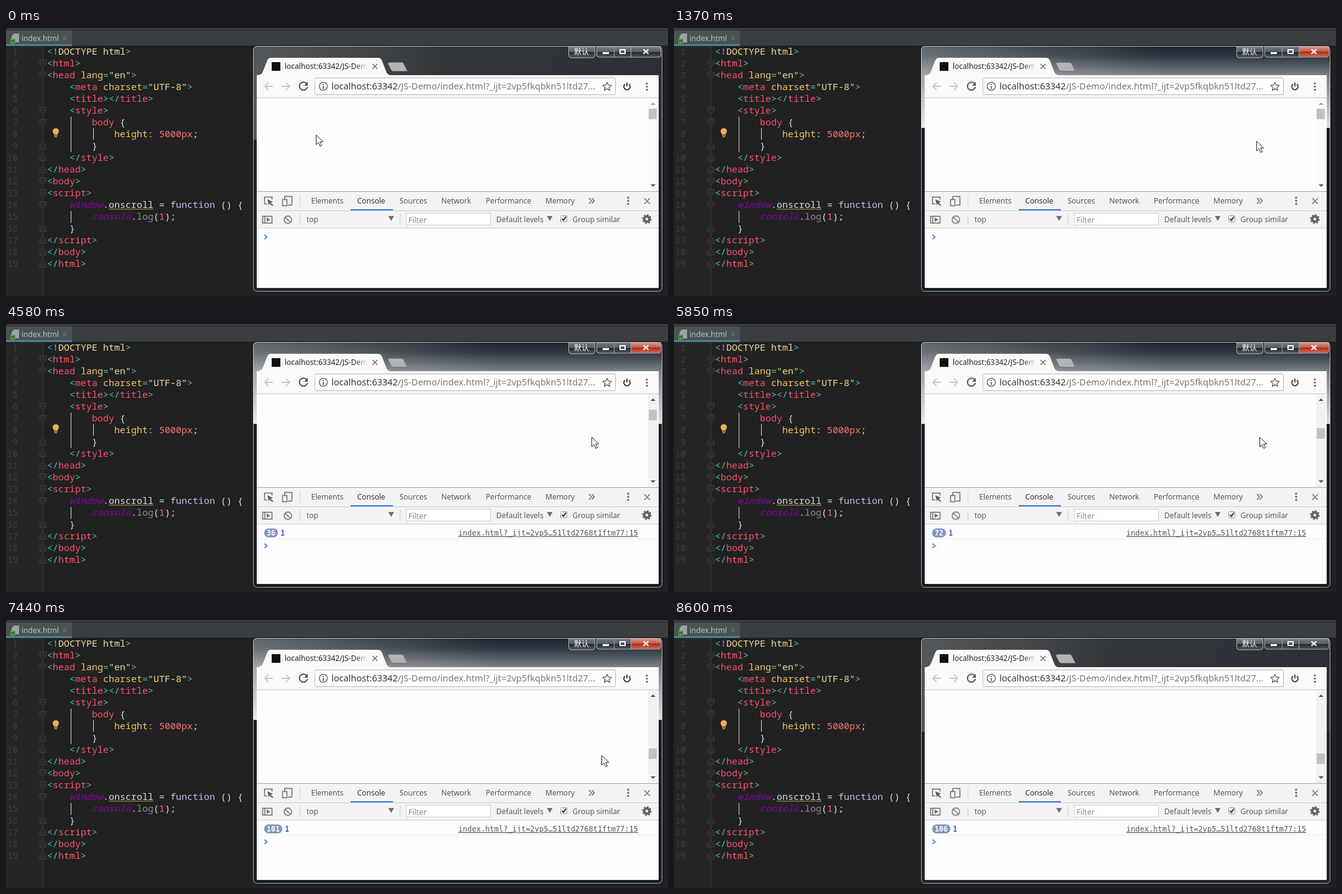
An HTML page for the animation above (8.64 s loop, 1064 px wide and 432 px high).

```html
<!DOCTYPE html>
<html lang="en">
<head>
<meta charset="UTF-8">
<title>Scroll counter</title>
<style>
  html, body { margin: 0; width: 100%; height: 100%; overflow: hidden; background: #212121; }
  svg { display: block; width: 1064px; height: 432px; }
  text { white-space: pre; font-family: "Noto Sans", "Open Sans", sans-serif; font-size: 12px; }
  #code text { font-family: "Noto Sans Mono", "DejaVu Sans Mono", monospace; font-size: 15px; }
  #code .number { font-size: 14px; fill: #3d4042; text-anchor: end; }
  .ui { font-size: 12.2px; fill: #5a5a5a; }
  .mono { font-family: "DejaVu Sans Mono", monospace; }
  .line { fill: none; stroke: #6e6e6e; stroke-width: 1.5; }
</style>
</head>
<body>
<svg viewBox="0 0 1064 432">
  <defs>
    <linearGradient id="idle">
      <stop stop-color="#55585b"/><stop offset=".45" stop-color="#34383d"/><stop offset="1" stop-color="#2b2f35"/>
    </linearGradient>
    <linearGradient id="focus" x2="0" y2="1">
      <stop stop-color="#1d2630"/><stop offset=".12" stop-color="#2b343e"/>
      <stop offset=".36" stop-color="#7d8288"/><stop offset="1" stop-color="#dde0e3"/>
    </linearGradient>
    <linearGradient id="shine">
      <stop stop-color="#fff" stop-opacity=".3"/><stop offset=".6" stop-color="#fff" stop-opacity="0"/>
    </linearGradient>
    <linearGradient id="glass" x2="0" y2="1">
      <stop stop-color="#fff" stop-opacity=".38"/><stop offset=".48" stop-color="#fff" stop-opacity=".2"/>
      <stop offset=".5" stop-color="#000" stop-opacity=".3"/><stop offset="1" stop-color="#fff" stop-opacity=".12"/>
    </linearGradient>
    <linearGradient id="red" x2="0" y2="1">
      <stop stop-color="#dc9a8b"/><stop offset=".48" stop-color="#c65b48"/>
      <stop offset=".5" stop-color="#a8291a"/><stop offset="1" stop-color="#d0664c"/>
    </linearGradient>
    <linearGradient id="fade" gradientUnits="userSpaceOnUse" x1="560" x2="582" y1="0" y2="0">
      <stop stop-color="#222"/><stop offset="1" stop-color="#222" stop-opacity="0"/>
    </linearGradient>
    <clipPath id="titleClip"><path d="M440 48h140v26h-140z"/></clipPath>
    <clipPath id="windowClip"><rect x="397" y="29" width="658" height="396" rx="6"/></clipPath>
  </defs>

  <!-- editor -->
  <path fill="#212121" d="M0 0h1064v432H0z"/>
  <path fill="#3a3e40" d="M0 0h1064v28H0z"/>
  <path fill="#2a2d2f" d="M0 3h1064v1H0zM0 28h1064v1H0z"/>
  <path fill="#4b5254" d="M0 4h106v23H0z"/>
  <path fill="#4a8295" d="M0 26h106v3H0z"/>
  <path fill="#252525" d="M0 29h59v403H0z"/>
  <path fill="#9ba3a7" d="M13 9h8v14H9V13z"/>
  <path fill="#62a348" d="M7 17h8v8H7z"/>
  <path d="M9 18.500v5m4-5v5m-4-2.500h4" stroke="#24371d" fill="none"/>
  <text x="25" y="21" fill="#bfc3c5">index.html</text>
  <path d="M91.500 13.500l6 6m0-6l-6 6" stroke="#85898b"/>
  <path d="M59.500 29v403" stroke="#3b3b3b"/>
  <g id="code"></g>
  <path d="M104.500 143v57m36-39v19m-36 115v19" stroke="#d6d6d6"/>
  <path id="wave" fill="none" stroke="#b69a52"/>
  <circle cx="80" cy="166.500" r="5" fill="#f3b04b"/>
  <path fill="#f3b04b" d="M77 168h6v4h-6z"/>
  <path d="M77 173.500h6m-5 2h4" stroke="#c5c5c5"/>

  <!-- browser frame -->
  <g clip-path="url(#windowClip)">
    <path fill="url(#idle)" d="M397 29h658v396H397z"/>
    <path fill="#20242a" d="M397 180h658v245H397z"/>
    <g id="active">
      <path fill="url(#focus)" d="M397 29h658v132H397z"/>
      <path fill="url(#shine)" d="M397 29h658v132H397z"/>
      <path fill="#171e27" d="M397 161h658v264H397z"/>
    </g>
  </g>
  <rect x="396.500" y="28.500" width="659" height="397" rx="7" fill="none" stroke="#0d0f12"/>
  <rect x="397.500" y="29.500" width="657" height="395" rx="6" fill="none" stroke="#d5dade" stroke-opacity=".8"/>
  <path d="M904.500 30v14q0 4 4 4h34q4 0 4-4V30zM949.500 30v13q0 4 4 4h96q3 0 3-4V30z" fill="url(#glass)" stroke="#b2b7bc"/>
  <path id="closeRed" fill="url(#red)" d="M1005 30h47v13q0 3-3 3h-44z"/>
  <path d="M977.500 30v17m27-17v17" stroke="#a6abb0"/>
  <text x="925" y="43" text-anchor="middle" fill="#fff" style="font-family:'Noto Sans CJK SC','Noto Sans CJK',sans-serif">默认</text>
  <path d="M959 40.500h10" stroke="#fff" stroke-width="3"/>
  <path d="M987 35h8v6h-8z" fill="none" stroke="#fff" stroke-width="2"/>
  <path d="M1024.500 34.500l8 7m0-7l-8 7" stroke="#fff" stroke-width="2.200"/>

  <!-- tabs and address bar -->
  <path fill="#b2b4b6" stroke="#74777a" d="M616 55.500h20q2 0 3 2l6 12h-22q-3 0-4-2l-5-10q0-2 2-2z"/>
  <path fill="#f9f9f9" d="M403 76q8 0 10-6l7-18q2-4 6-4h172q4 0 6 4l7 18q2 6 8 6h430v37H403z"/>
  <path fill="#111" d="M427 55h14v14h-14z"/>
  <text x="448" y="66" fill="url(#fade)" clip-path="url(#titleClip)">localhost:63342/JS-Demo</text>
  <path class="line" d="M589 58l8 8m0-8l-8 8"/>
  <path d="M429 94h-13m6-6l-6 6 6 6M443 94h13m-6-6l6 6-6 6" fill="none" stroke="#cacaca" stroke-width="1.800"/>
  <path d="M483.500 90a6.500 6.500 0 1 0 1 5" fill="none" stroke="#555" stroke-width="2"/>
  <path d="M485 87v6h-6z" fill="#555"/>
  <rect x="496.500" y="80.500" width="483" height="27" rx="2" fill="#fff" stroke="#b4b4b4"/>
  <circle class="line" cx="510" cy="94" r="6.500"/>
  <path d="M510 90v2m0 1.500v5" stroke="#555" stroke-width="1.600"/>
  <text x="523" y="99" style="font-size:14.5px" fill="#777"><tspan fill="#333">localhost:63342</tspan>/JS-Demo/index.html?_ijt=2vp5fkqbkn51ltd27...</text>
  <path class="line" stroke-linejoin="round" d="M966 87.500l2 4.500 5 .5-3.800 3.300 1.200 4.700-4.400-2.500-4.400 2.500 1.200-4.700-3.800-3.300 5-.5z"/>
  <path d="M995 90.500a5 5 0 1 0 6 0M998 88v6" fill="none" stroke="#333" stroke-width="1.800"/>
  <g fill="#555"><circle cx="1030" cy="89.500" r="1.500"/><circle cx="1030" cy="94.500" r="1.500"/><circle cx="1030" cy="99.500" r="1.500"/></g>

  <!-- page -->
  <path fill="#fdfdfd" d="M403 113h646v306H403z"/>
  <path d="M403 112.500h646" stroke="#c9c9c9"/>
  <path id="track" d="M1032 113h15v150h-15z"/>
  <path id="up" d="M1036 124l4-4 4 4z"/>
  <path fill="#505050" d="M1036 252l4 4 4-4z"/>
  <rect id="thumb" x="1033" width="13" height="17" fill="#c1c1c1"/>

  <!-- developer tools -->
  <path fill="#f3f3f3" d="M403 264h646v59H403z"/>
  <path d="M403 263.500h646" stroke="#a8a8a8"/>
  <path d="M403 294.500h646M403 322.500h646M472.500 270v18m0 12v17M633.500 300v17" stroke="#cfcfcf"/>
  <path fill="#3b78e7" d="M554 292h68v2h-68z"/>
  <path class="line" d="M420 283.500h-4.500v-11h12v4"/>
  <path fill="#5f5f5f" d="M420 276l9 4-3.500 1.500 4 4-1.500 1.500-4-4-1.500 3z"/>
  <path class="line" d="M448 276v-4.500h11.500v14H453M444.500 276.500h7v10h-7z"/>
  <g id="tools" class="ui"></g>
  <path class="line" d="M937 274l4 4.500-4 4.500m4.500-9l4 4.500-4 4.500M1026 274.500l9 9m0-9l-9 9"/>
  <g fill="#6e6e6e"><circle cx="1000" cy="273.500" r="1.700"/><circle cx="1000" cy="278.500" r="1.700"/><circle cx="1000" cy="283.500" r="1.700"/></g>
  <path class="line" d="M412.500 303.500h15v11h-15zM416 303v12"/>
  <path fill="#6e6e6e" d="M419 305.500l6 3.500-6 3.500zM614.500 303h9l-4.500 8zM869.500 303h9l-4.500 8z"/>
  <circle class="line" cx="453" cy="309" r="6"/><path class="line" d="M448.800 304.800l8.400 8.400"/>
  <rect x="643.500" y="298.500" width="135" height="19" fill="#fff" stroke="#cdcdcd"/>
  <text x="647" y="314" class="ui" style="fill:#888">Filter</text>
  <rect x="891.500" y="302.500" width="10" height="10" rx="1" fill="#fff" stroke="#999"/>
  <path d="M893.500 307.500l2.500 2.500 4-6" fill="none" stroke="#333" stroke-width="2"/>
  <circle cx="1030" cy="308" r="4.200" fill="none" stroke="#646464" stroke-width="4"/>
  <circle cx="1030" cy="308" r="6.800" fill="none" stroke="#646464" stroke-width="2" stroke-dasharray="2.670"/>

  <!-- console -->
  <g id="log">
    <path d="M403 346.500h646" stroke="#eee"/>
    <rect id="badge" x="415" y="329.500" height="14.500" rx="7" fill="#8097bd"/>
    <text id="count" class="mono" y="341" text-anchor="middle" fill="#fff" font-weight="bold" style="font-size:11.5px"></text>
    <text id="value" class="mono" y="341" fill="#1c00cf">1</text>
    <text class="mono" x="1016" y="341" text-anchor="end" fill="#555" text-decoration="underline">index.html?_ijt=2vp5…51ltd2768t1ftm77:15</text>
  </g>
  <path id="prompt" d="M415.500 -3.500l4 3.500-4 3.500" fill="none" stroke="#4a8cf0" stroke-width="1.800"/>
  <path id="cursor" d="M.5.5v15.500l3.700-3.500 2.700 6 2.600-1.100-2.700-6h5z" fill="#fff" stroke="#20242c"/>
</svg>

<script>
const $ = id => document.getElementById(id);
const set = (id, attrs) => { for (const name in attrs) $(id).setAttribute(name, attrs[name]); };

// Each line: indent in columns, then pieces led by a colour key.
const colors = { p: '#4fc1b0', r: '#f9526b', y: '#f5c869', s: '#f0dc95', w: '#d8dee3', n: '#f0776c', f: '#c9b8ee', g: '#660e7a', m: '#94868c' };
const source = `0|p<!|sDOCTYPE html|p>
0|p<|rhtml|p>
0|p<|rhead |ylang|p=|s"en"|p>
4|p<|rmeta |ycharset|p=|s"UTF-8"|p>
4|p<|rtitle|p></|rtitle|p>
4|p<|rstyle|p>
8|rbody |w{
12|yheight|w: |n5000px|w;
8|w}
4|p</|rstyle|p>
0|p</|rhead|p>
0|p<|rbody|p>
0|p<|rscript|p>
4|gwindow|w.onscroll = |ffunction |w() {
8|gconsole|w.|mlog|w(|n1|w);
4|w}
0|p</|rscript|p>
0|p</|rbody|p>
0|p</|rhtml|p>`.split('\n');
const escape = text => text.replace(/</g, '&lt;');
const foldStarts = [2, 3, 6, 7, 12, 13, 14], foldEnds = [9, 10, 11, 16, 17, 18, 19];

$('code').innerHTML = source.map((line, i) => {
  const [indent, ...pieces] = line.split('|');
  const y = 38 + i * 19;
  const spans = pieces.map(piece => {
    const style = piece[0] === 'g' ? ' font-weight="bold" font-style="italic"' : '';
    return `<tspan fill="${colors[piece[0]]}"${style}>${escape(piece.slice(1))}</tspan>`;
  }).join('');
  const flip = foldStarts.includes(i + 1) ? 1 : foldEnds.includes(i + 1) ? -1 : 0;
  const fold = flip && `<path transform="translate(59.5 ${y}) scale(1 ${flip})" d="M-5-5H5V1L0 5-5 1zM-2.500-1h5" fill="#252525" stroke="#454545"/>`;
  return `<text class="number" x="19" y="${y + 5}">${i + 1}</text>${fold || ''}<text x="${66 + indent * 9}" y="${y + 5}">${spans}</text>`;
}).join('');

set('wave', { d: 'M165 293' + 'l2-2 2 2'.repeat(18) });

const label = (x, y, text, fill = '#5a5a5a') => `<text x="${x}" y="${y}" fill="${fill}">${text}</text>`;
$('tools').innerHTML = label(490.5, 283, 'Elements') + label(564.5, 283, 'Console', '#333') + label(632.5, 283, 'Sources')
  + label(699.5, 283, 'Network') + label(771, 283, 'Performance') + label(867, 283, 'Memory')
  + label(483, 313, 'top') + label(788, 313, 'Default levels') + label(910.5, 313, 'Group similar');

// Scroll bursts: start, end, steps, final count, final thumb position.
const bursts = [
  [2490, 2650, 5, 5, 132], [3180, 3530, 11, 16, 134], [3970, 4280, 10, 35, 138],
  [4580, 4880, 9, 50, 148], [5020, 5240, 7, 61, 158], [5500, 5680, 6, 71, 168],
  [5850, 6370, 13, 85, 189], [6740, 7440, 14, 101, 207], [7500, 7560, 2, 106, 215]
];

// Number of steps already shown; the first one comes at the start time.
const stepAt = (t, start, end, steps) =>
  t < start ? 0 : Math.min(steps, 1 + Math.floor((t - start) / (end - start) * (steps - 1)));
const mix = (a, b, s) => a + (b - a) * s;
const smooth = s => s * s * (3 - 2 * s);
const bezier = (a, b, c, s) => mix(mix(a, b, s), mix(b, c, s), s);

function scrollState(t) {
  let count = 0, thumb = 130;
  for (const [start, end, steps, nextCount, nextThumb] of bursts) {
    const k = stepAt(t, start, end, steps);
    if (!k) break;
    count = Math.floor(mix(count, nextCount, k / steps));
    thumb = Math.round(mix(thumb, nextThumb, (k - 1) / (steps - 1)));
  }
  return { count, thumb };
}

function cursorAt(t) {
  if (t < 2930) {
    const s = smooth(stepAt(t, 940, 1370, 11) / 11);
    return [mix(498, 936, s), mix(172, 182, s)];
  }
  if (t < 7770) {
    const s = stepAt(t, 6200, 6370, 5) / 5;
    return [mix(941, 957, s), mix(182, 218, s)];
  }
  const s = stepAt(t, 7770, 7960, 6) / 6;
  return [bezier(957, 660, 1066, s), bezier(218, 330, 375, s)];
}

function render(t) {
  const focus = t >= 8600 ? 0 : stepAt(t, 680, 800, 3) / 3;
  set('active', { opacity: focus });
  set('closeRed', { opacity: focus });

  const { count, thumb } = scrollState(t);
  const width = 8 + 7 * String(count).length;
  set('thumb', { y: thumb });
  set('track', { fill: count ? '#f1f1f1' : '#fafafa' });
  set('up', { fill: count ? '#505050' : '#a3a3a3' });
  set('log', { visibility: count ? 'visible' : 'hidden' });
  set('badge', { width });
  set('count', { x: 415 + width / 2 });
  set('value', { x: 419 + width });
  set('prompt', { transform: `translate(0 ${count ? 357.5 : 337})` });
  $('count').textContent = count;

  const [x, y] = cursorAt(t).map(Math.round);
  set('cursor', { transform: `translate(${x} ${y})` });
}

function tick() {
  render(performance.now() % 8640);
  requestAnimationFrame(tick);
}
tick();
</script>
</body>
</html>
```
